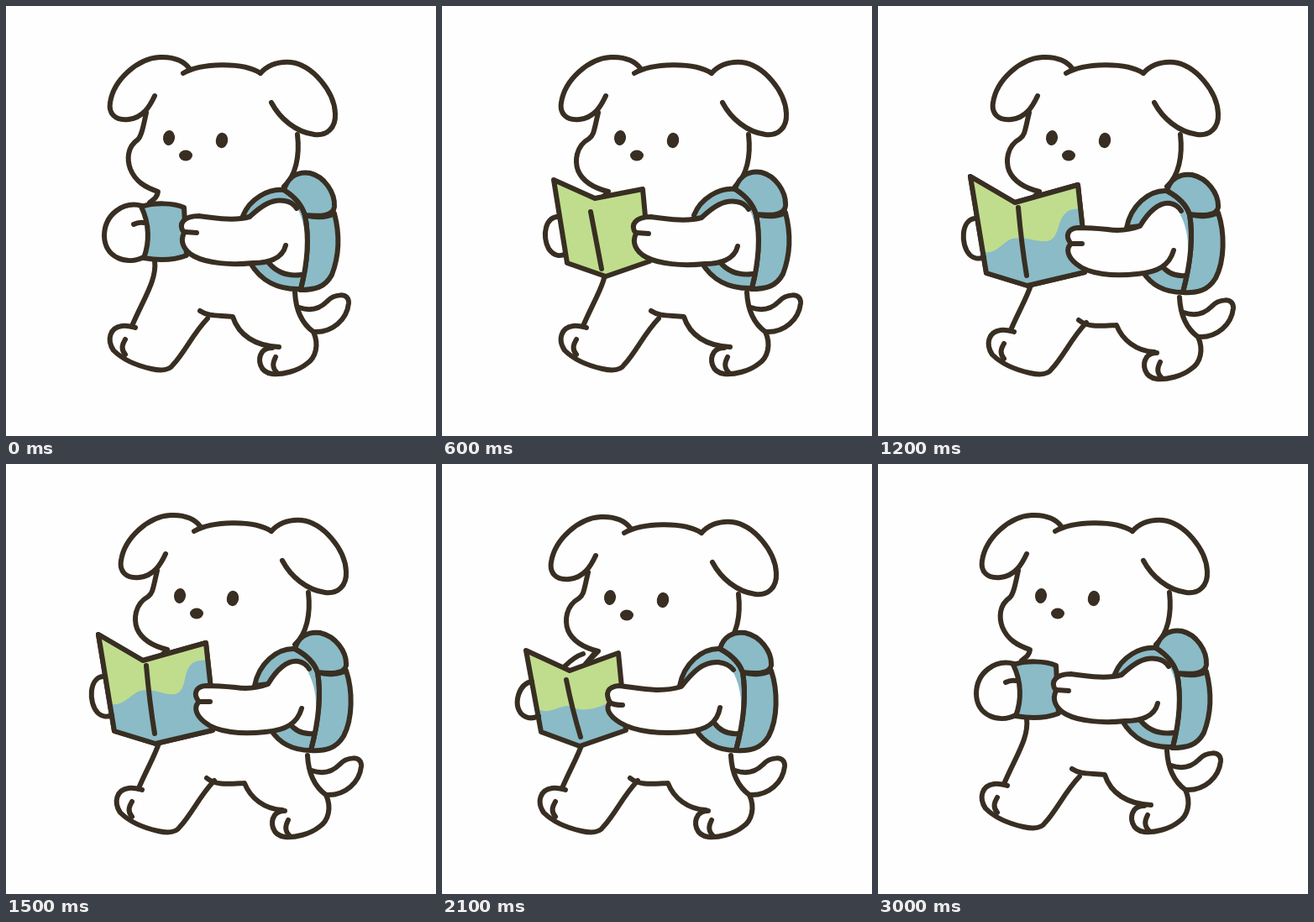
Recreate the animation shown at these times as an HTML page. Size 512 px wide and 512 px high, loop 3300 ms.

```html
<!DOCTYPE html>
<html lang="en">
<head>
<meta charset="utf-8">
<title>Puppy with a map</title>
<style>
  html, body { margin: 0; width: 100%; height: 100%; overflow: hidden; background: #fefefe; }
  svg { display: block; width: 512px; height: 512px; overflow: hidden; }
  path { fill: none; stroke: #382e22; stroke-width: 6; stroke-linecap: round; stroke-linejoin: round; }
  .white { fill: #fefefe; }
  .blue { fill: #8abbc7; }
  .green { fill: #c0dd8d; }
  .flat { stroke: none; }
  .dot { fill: #382e22; }

  /* Poses sit side by side; the strip jumps forward, then back. */
  #strip { animation: walk 3300ms step-end infinite; }
  @keyframes walk {
    0%, 90.9%, 100% { transform: translateX(0); }
    9.09%, 81.81% { transform: translateX(-512px); }
    18.18%, 72.72% { transform: translateX(-1024px); }
    27.27%, 63.63% { transform: translateX(-1536px); }
    36.36%, 54.54% { transform: translateX(-2048px); }
    45.45% { transform: translateX(-2560px); }
  }
</style>
</head>
<body>
<svg viewBox="0 0 512 512">
  <defs>
    <g id="head">
      <path d="M177,107 C171,120 163,133 146,135 C129,137 122,127 124,115 C128,88 157,62 183,61 C202,60 213,67 218,74"/>
      <path d="M211,80 C232,68 281,66 303,80"/>
      <path d="M303,80 C313,69 325,66 339,67 C365,70 391,102 392,128 C393,145 382,155 367,153 C345,150 326,134 316,115"/>
      <path d="M347,153 C350,179 345,202 331,215"/>
      <ellipse class="dot" cx="194" cy="157" rx="7" ry="9" transform="rotate(8 194 157)"/>
      <ellipse class="dot" cx="257" cy="160" rx="7.2" ry="9.2" transform="rotate(8 257 160)"/>
      <ellipse class="dot" cx="214" cy="178" rx="8" ry="6.5"/>
    </g>
    <path id="cheek" d="M168,127 C163,148 163,154 157,158 C141,167 140,185 144,196 C150,210 164,217 180,221 L173,228"/>

    <g id="pack">
      <path class="blue" d="M356,249 C372,253 384,251 391,247 C397,270 398,294 388,320 C380,335 368,338 350,338 Z"/>
      <path class="blue" d="M282,250 C290,230 312,217 331,219 C344,227 352,236 356,249 C362,280 358,310 351,337 C324,338 303,327 291,306 Z"/>
      <path class="white flat" d="M288,253 C298,249 305,233 325,231 C338,231 345,236 348,243 C359,265 359,297 354,321 C335,322 323,319 313,306 L290,304 Z"/>
      <path d="M313,306 C324,319 337,322 352,320"/>
      <path d="M331,219 C344,227 352,236 356,249 C362,280 358,310 351,337"/>
      <path class="blue" d="M331,219 C336,203 348,197 362,199 C379,203 392,222 391,239 C390,250 375,251 356,249 C352,236 344,227 331,219 Z"/>
    </g>
    <g id="low-pack">
      <path class="blue" d="M371,248 C384,252 397,250 405,246 C413,270 413,303 402,324 C393,339 380,342 363,341 Z"/>
      <path class="blue" d="M296,264 C301,238 322,219 344,220 C357,227 367,236 371,248 C376,278 371,311 363,341 C341,341 325,332 315,316 L312,262 Z"/>
      <path class="white flat" d="M312,264 C322,247 337,235 352,238 C372,258 372,298 366,321 C352,322 343,318 338,308 L318,300 Z"/>
      <path d="M337,308 C344,318 353,322 366,321"/>
      <path d="M344,220 C357,227 367,236 371,248 C376,278 371,311 363,341"/>
      <path class="blue" d="M344,220 C348,206 359,199 374,201 C392,205 406,223 405,240 C403,250 388,250 371,248 C367,236 357,227 344,220 Z"/>
    </g>

    <g id="back">
      <path class="white" d="M349,359 C363,364 374,360 382,352 C390,343 409,340 408,354 C406,373 389,389 367,388"/>
      <path d="M344,341 C345,361 351,377 366,388 C373,403 369,419 358,426 C347,435 329,439 317,438 C302,436 299,421 305,412 C308,408 312,407 317,407"/>
      <path d="M323,437 C316,430 318,424 321,418"/>
    </g>
    <path id="belly" d="M231,363 C241,370 254,368 270,370 C277,392 297,405 325,406"/>
    <path id="low-belly" d="M239,374 C250,383 265,381 284,380 C291,398 308,411 329,412"/>
    <g id="front">
      <path d="M177,303 C180,326 164,348 150,381"/>
      <path d="M240,372 C222,391 213,412 199,427 C194,435 182,434 173,432 C155,428 139,421 128,410 C120,398 123,383 138,381 C145,380 150,382 154,383"/>
      <path d="M142,415 C136,408 139,402 142,397"/>
    </g>

    <g id="arm">
      <path class="white" d="M333,285 C329,302 310,306 294,306 C267,309 239,306 224,298 C211,291 207,280 212,270 C204,259 212,250 230,250 C252,253 273,256 290,251 C304,238 317,229 332,232 C339,233 343,236 346,241"/>
      <path d="M213,269 L227,270"/>
    </g>
    <g id="low-arm">
      <path class="white" d="M352,291 C347,309 333,317 309,319 C281,322 251,320 236,307 C226,299 223,289 230,283 C222,274 226,265 238,264 C251,264 263,265 273,266 C287,268 299,267 312,262 C322,245 335,233 348,235 C354,236 358,239 361,244"/>
      <path d="M230,283 L243,283"/>
    </g>

    <path id="map" d="M110,203 L163,234 L238,213 L244,268 L246,317 L178,333 L129,318 Z"/>
    <g id="map-lines">
      <use href="#map"/>
      <path d="M167,240 Q171,285 177,321"/>
      <path d="M115,253 C99,255 98,284 109,296 C115,302 122,301 126,299"/>
    </g>
    <g id="wide-body">
      <use href="#head" x="13"/><use href="#cheek" x="12"/>
      <use href="#back" x="15" y="6"/><use href="#low-belly"/><use href="#front" x="8" y="5"/><use href="#low-pack"/>
      <use href="#map" class="green"/>
      <path class="green flat" d="M110,203 L163,234 L238,213 L244,268 L246,317 L178,333 L129,318 Z"/>
    </g>
  </defs>

  <g id="strip">
    <g>
      <use href="#head"/>
      <path d="M167,127 C163,146 161,155 157,159 C144,168 144,183 148,194 C154,209 166,216 181,221 C180,228 176,230 171,234"/>
      <use href="#back"/><use href="#belly"/><use href="#front"/><use href="#pack"/>
      <path class="white" d="M162,238 C140,232 117,248 117,274 C118,300 144,309 164,299"/>
      <path d="M152,260 Q158,257 164,258"/>
      <path class="blue" d="M161,239 C176,234 199,234 212,240 L215,297 C199,303 180,303 164,300 C171,282 171,259 161,239 Z"/>
      <use href="#arm"/>
    </g>

    <g transform="translate(512)">
      <use href="#head" x="9"/><use href="#cheek" x="9"/>
      <use href="#back" x="9"/><use href="#belly" x="9"/><use href="#front" x="9"/><use href="#pack" x="9"/>
      <path d="M139,247 C119,246 115,275 124,290 C131,299 139,298 145,295"/>
      <path class="green" d="M137,220 L176,234 L224,225 L231,299 L185,315 L148,303 Z"/>
      <path d="M171,247 L181,306"/>
      <use href="#arm" x="9"/>
    </g>

    <g transform="translate(1024)">
      <use href="#head" x="18"/><use href="#cheek" x="18"/>
      <use href="#back" x="19"/><use href="#belly" x="18"/><use href="#front" x="18"/><use href="#pack" x="18" y="-1"/>
      <path d="M142,251 C122,248 119,275 127,289 C134,299 142,298 147,295"/>
      <path class="green" d="M133,207 L182,229 L239,218 L247,304 L195,322 L149,306 Z"/>
      <path d="M177,245 L190,313"/>
      <use href="#arm" x="19" y="1"/>
    </g>

    <g transform="translate(1536)">
      <use href="#head" x="6" y="2"/><use href="#cheek" x="6" y="2"/>
      <path d="M182,225 L171,238 M168,226 C159,229 152,235 146,241"/>
      <use href="#back" x="0" y="6"/><use href="#low-belly" x="-15"/><use href="#front" x="-7" y="5"/><use href="#low-pack" x="-13"/>
      <path class="green flat" d="M100,222 L152,246 L210,225 L219,317 L164,336 L118,319 Z"/>
      <path class="blue flat" d="M112,290 C125,301 138,287 152,288 C167,296 181,292 197,285 L217,285 L219,317 L164,336 L118,319 Z"/>
      <path d="M100,222 L152,246 L210,225 L219,317 L164,336 L118,319 Z"/>
      <path d="M148,257 Q155,292 165,325"/>
      <path d="M107,259 C91,262 85,285 94,297 C101,304 109,303 115,300"/>
      <path class="white" d="M331,290 C328,309 314,317 291,319 C261,322 230,319 212,308 C199,300 194,291 200,284 C194,273 197,265 211,264 C236,267 260,273 285,265 C299,247 311,235 329,236 C338,237 343,240 347,245"/>
      <path d="M200,284 C204,287 209,287 215,287"/>
    </g>

    <g transform="translate(2048)">
      <use href="#wide-body"/>
      <path class="blue flat" d="M126,293 C141,296 148,281 160,277 C175,274 187,281 202,280 C216,276 213,258 222,248 C229,240 235,243 242,240 L246,317 L178,333 L129,318 Z"/>
      <use href="#map-lines"/>
      <use href="#low-arm"/>
    </g>

    <g transform="translate(2560)">
      <use href="#wide-body"/>
      <path class="blue flat" d="M125,286 C141,288 148,274 160,270 C176,266 187,276 202,274 C216,268 210,250 220,239 C227,232 234,235 241,232 L246,317 L178,333 L129,318 Z"/>
      <use href="#map-lines"/>
      <use href="#low-arm"/>
    </g>
  </g>
</svg>
</body>
</html>
```
